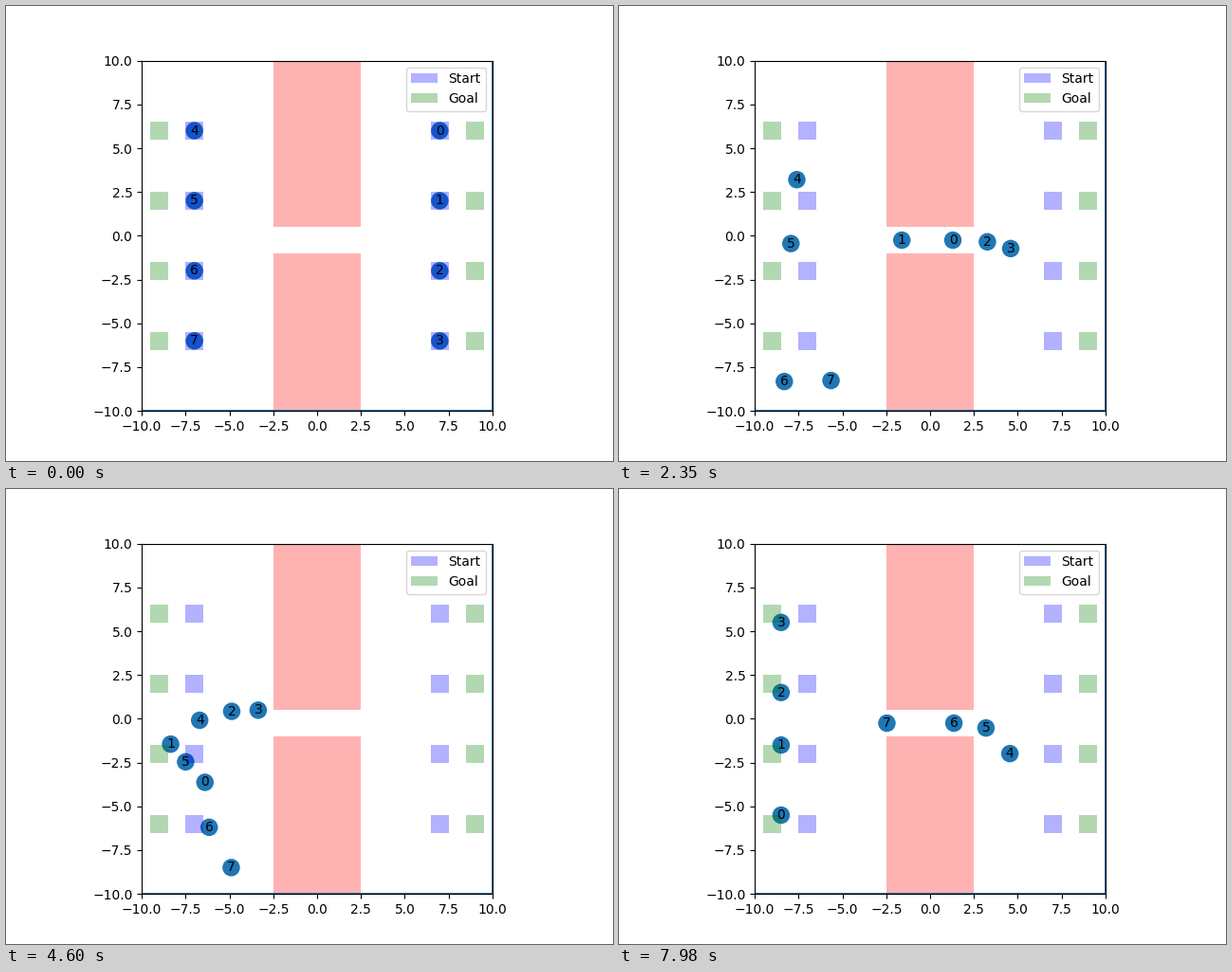
Animation of 640 by 480 pixels, one loop 8000 ms. Source, as a matplotlib script:

```python
from math import copysign

import numpy as np
import matplotlib.pyplot as plt
from matplotlib.animation import FuncAnimation
from matplotlib.patches import Circle, Rectangle

STEP = 25       # ms per frame
FRAMES = 320
ROWS = (6, 2, -2, -6)
GAP_X, GAP_Y = 2.6, -0.25   # half length and height of the lane in the wall


def route(side, row, enter, leave, arrive, before=(), after=()):
    """Start, detours, lane through the wall, detours, mirrored goal corner.

    enter is (time, distance from the middle); detours are (time, x, y).
    """
    t_in, x_in = enter
    goal_y = copysign(0.5, row) - row
    return np.array([
        (0, 7 * side, row), *before,
        (t_in, x_in * side, GAP_Y), (leave, -GAP_X * side, GAP_Y),
        *after, (arrive, -8.5 * side, goal_y)])


routes = [
    route(1, 6, (1.96, 2.9), 3.3, 5.32),
    route(1, 2, (0.98, 3.6), 2.61, 4.65, after=[(3.28, -4.55, -0.08)]),
    route(1, -2, (2.42, 3.08), 3.88, 5.75, before=[(0.42, 8.5, -3)]),
    route(1, -6, (2.93, 3.2), 4.34, 6.36,
          before=[(1.32, 7.3, -4.28), (2.46, 4.31, -0.35)]),
    route(-1, 6, (6.06, 2.6), 7.29, 9.36,
          before=[(3.9, -8, 1.36), (4.68, -6.55, -0.25)]),
    route(-1, 2, (6.52, 2.6), 7.76, 9.9,
          before=[(3.75, -8.5, -1.9), (4.77, -7.3, -2.57)],
          after=[(8.27, 4, -0.9)]),
    route(-1, -2, (7.02, 2.8), 8.26, 10.4,
          before=[(2.16, -8.5, -8.5), (4.7, -6.06, -6.1)]),
    route(-1, -6, (7.93, 2.65), 9.2, 11.2,
          before=[(1.07, -6.08, -8.13), (4.66, -4.88, -8.5),
                  (5.88, -8.5, -5.9)]),
]


def place(path, t):
    return [np.interp(t, path[:, 0], path[:, k]) for k in (1, 2)]


fig, ax = plt.subplots(figsize=(6.4, 4.8), dpi=100)
ax.set_aspect("equal")
ax.set_xlim(-10, 10)
ax.set_ylim(-10, 10)
ticks = np.linspace(-10, 10, 9)
ax.set_xticks(ticks)
ax.set_yticks(ticks)


def block(x, y, w, h, color, label=None):
    ax.add_patch(Rectangle((x, y), w, h, facecolor=color, alpha=0.3,
                           label=label))


ax.plot([-10, 10, 10, -10, -10], [-10, -10, 10, 10, -10], color="C0", lw=1.5)
block(-2.5, 0.5, 5, 9.5, "red")
block(-2.5, -10, 5, 9, "red")
for col, color, label in ((7, "blue", "Start"), (9, "green", "Goal")):
    for side in (1, -1):
        for y in ROWS:
            block(side * col - 0.5, y - 0.5, 1, 1, color, label)
            label = None
ax.legend(loc="upper right")

# Agents lie beneath the translucent regions
discs = [ax.add_patch(Circle((0, 0), 0.5, facecolor="C0", zorder=0.5))
         for _ in routes]
tags = [ax.text(0, 0, str(i), ha="center", va="center")
        for i in range(len(routes))]


def update(i):
    for path, disc, tag in zip(routes, discs, tags):
        pos = place(path, i * STEP / 1000)
        disc.center = pos
        tag.set_position(pos)
    return discs + tags


anim = FuncAnimation(fig, update, frames=FRAMES, interval=STEP, repeat=True,
                     repeat_delay=0)
plt.show()
```
